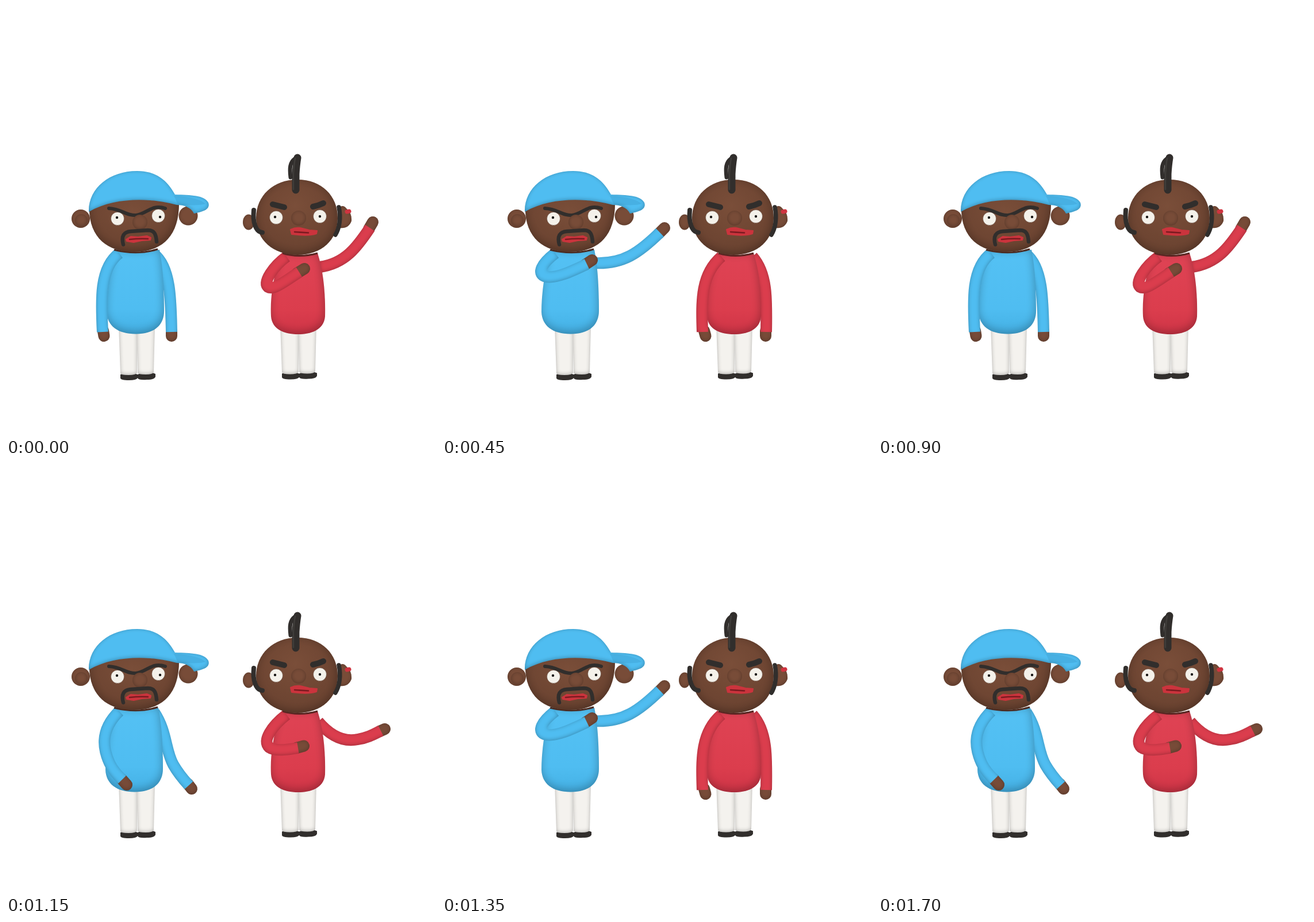
Animation, 748 px wide and 748 px high, one loop 1800 ms. Source, as an HTML page without scripts:

```html
<!DOCTYPE html>
<html lang="en">
<head>
<meta charset="utf-8">
<title>Two clay figures waving</title>
<style>
  html, body { margin: 0; width: 100%; height: 100%; overflow: hidden; background: #fff; }
  svg { display: block; width: 100vw; height: 100vh; }

  .blue { --cloth: #4fbdf1; --body: url(#blueCloth); }
  .red { --cloth: #db3d4d; --body: url(#redCloth); }
  .torso { fill: var(--body); filter: url(#soft); }
  .arm { fill: none; stroke: var(--cloth); stroke-width: 20; filter: url(#clay); }
  .hand { stroke: #774b38; stroke-linecap: round; }
  .head { fill: url(#skin); filter: url(#soft); }
  .bump { fill: #784c38; filter: url(#clay); }
  .hair { fill: none; stroke: #312e2c; stroke-linecap: round; stroke-linejoin: round; }
  .lip { fill: #cb343d; stroke: #cb343d; stroke-width: 2; stroke-linejoin: round; }
  .slit { fill: none; stroke: #7b1b20; stroke-width: 2.5; stroke-linecap: round; }
  .eye { fill: #f4f1ea; stroke: #4b2d20; stroke-opacity: .5; }
  .pupil { fill: #171514; }

  /* one swing there and back: rest 250, pass 100 + 100, rest 250, pass 100 + 100 */
  .pose { animation: 900ms step-end infinite; visibility: hidden; }
  .p1 { animation-name: p1; }
  .p2 { animation-name: p2; }
  .p3 { animation-name: p3; }
  .p4 { animation-name: p4; }
  @keyframes p1 { 0% { visibility: visible } 27.77%, 100% { visibility: hidden } }
  @keyframes p2 { 0%, 38.88% { visibility: hidden } 27.77%, 88.88%, 100% { visibility: visible } }
  @keyframes p3 { 0%, 49.99%, 88.88%, 100% { visibility: hidden } 38.88%, 77.77% { visibility: visible } }
  @keyframes p4 { 0%, 77.77%, 100% { visibility: hidden } 49.99% { visibility: visible } }
</style>
</head>
<body>
<svg viewBox="0 0 748 748" role="img" aria-label="Two clay figures taking turns to wave">
  <defs>
    <filter id="clay" x="-100%" y="-100%" width="300%" height="300%" color-interpolation-filters="sRGB">
      <feGaussianBlur in="SourceAlpha" stdDeviation="3.500"/>
      <feOffset dx="-.5" dy="-1.500" result="core"/>
      <feComposite in="SourceAlpha" in2="core" operator="out"/>
      <feComponentTransfer result="shade"><feFuncA type="linear" slope=".28"/></feComponentTransfer>
      <feMerge><feMergeNode in="SourceGraphic"/><feMergeNode in="shade"/></feMerge>
    </filter>
    <filter id="soft" x="-20%" y="-20%" width="140%" height="140%" color-interpolation-filters="sRGB">
      <feGaussianBlur in="SourceAlpha" stdDeviation="8"/>
      <feOffset dx="-1" dy="-3" result="core"/>
      <feComposite in="SourceAlpha" in2="core" operator="out"/>
      <feComponentTransfer result="shade"><feFuncA type="linear" slope=".28"/></feComponentTransfer>
      <feMerge><feMergeNode in="SourceGraphic"/><feMergeNode in="shade"/></feMerge>
    </filter>
    <linearGradient id="blueCloth" x2="0" y2="1">
      <stop stop-color="#54c1f4"/><stop offset=".7" stop-color="#4fbdf1"/><stop offset="1" stop-color="#44b0e4"/>
    </linearGradient>
    <linearGradient id="redCloth" x2="0" y2="1">
      <stop stop-color="#df4354"/><stop offset=".7" stop-color="#db3d4d"/><stop offset="1" stop-color="#ce3446"/>
    </linearGradient>
    <radialGradient id="skin" cx=".48" cy=".35" r=".7">
      <stop stop-color="#7a4e39"/><stop offset="1" stop-color="#68412f"/>
    </radialGradient>

    <path id="blueTorso" class="torso" d="M188 425Q226 433 265 424C272 458 273 500 273 530C273 556 255 570.500 224 570.500C192 570.500 174 556 173 532C173 500 179 458 188 425Z"/>
    <path id="redTorso" class="torso" d="M481 430Q511 438 542 430C552 460 556 500 555 540C553 564 530 571 508 571C483 571 463 562 461 540C459 500 467 460 481 430Z"/>

    <g id="legs">
      <g fill="#312e2c">
        <path d="M199 641Q214 634 229 641V647Q227 651 214 651Q199 651 199 647Z"/>
        <path d="M229 641Q245 633 260 640V645Q258 650 245 650Q230 651 229 647Z"/>
      </g>
      <g fill="#f4f2ee" filter="url(#clay)">
        <path d="M196 556H228V638Q226 642 213 642Q200 642 199 639Z"/>
      </g>
      <g fill="#f4f2ee" filter="url(#clay)">
        <path d="M227 556H259L257 637Q255 641 243 641Q230 641 229 638Z"/>
      </g>
    </g>
  </defs>

  <use href="#legs"/>
  <use href="#legs" x="281" y="-1.500"/>

  <g class="pose p1">
    <g class="blue">
      <g class="arm"><path class="hand" d="M288 565V574"/><path d="M258 432C286 454 287 510 288 567"/></g>
      <use href="#blueTorso" x="2"/>
      <g class="arm"><path class="hand" d="M169 565L170.500 574"/><path d="M197 430C163 455 165 510 168 567"/></g>
    </g>
    <g class="red">
      <g class="arm"><path class="hand" d="M631 388L638 376"/><path d="M546 454C590 448 611 419 633 386"/></g>
      <use href="#redTorso"/>
      <g class="arm"><path class="hand" d="M506 465L519 457"/><path d="M488 436C466 452 446 480 456 489C466 495 489 476 510 463"/></g>
    </g>
  </g>

  <g class="pose p2">
    <g class="blue">
      <g class="arm"><path class="hand" d="M316 556L323 565"/><path d="M258 432C280 465 277 498 291 523C299 537 308 548 318 559"/></g>
      <use href="#blueTorso"/>
      <g class="arm"><path class="hand" d="M201 548L210 558"/><path d="M197 430C160 466 171 500 180 520C186 533 194 541 202 549"/></g>
    </g>
    <g class="red">
      <g class="arm"><path class="hand" d="M650 465L659 461"/><path d="M543 448C565 474 588 484 612 479C630 476 640 470 652 464"/></g>
      <use href="#redTorso"/>
      <g class="arm"><path class="hand" d="M505 494L518 490.500"/><path d="M488 436C462 456 445 482 458 493C468 500 490 497 508 494"/></g>
    </g>
  </g>

  <g class="pose p3">
    <g class="blue">
      <g class="arm"><path class="hand" d="M366 500L377 499.500"/><path d="M260 436C276 470 285 482 302 490C325 501 348 501 368 500"/></g>
      <use href="#blueTorso" x="-1"/>
      <g class="arm"><path class="hand" d="M232 509L246 510"/><path d="M197 430C158 469 166 486 182 495C196 502 214 507 234 509"/></g>
    </g>
    <g class="red">
      <g class="arm"><path class="hand" d="M615 544L624.500 548.500"/><path d="M544 448C567 475 566 500 582 520C592 534 605 541 617 545"/></g>
      <use href="#redTorso"/>
      <g class="arm"><path class="hand" d="M499 517L512 519.500"/><path d="M488 436C455 468 448 490 462 502C472 510 488 515 501 518"/></g>
    </g>
  </g>

  <g class="pose p4">
    <g class="blue">
      <g class="arm"><path class="hand" d="M377 396L387 386"/><path d="M264 447C315 450 343 429 379 394"/></g>
      <use href="#blueTorso"/>
      <g class="arm"><path class="hand" d="M249 450L261 442"/><path d="M197 430C172 449 166 465 178 470C195 476 225 462 252 449"/></g>
    </g>
    <g class="red">
      <g class="arm"><path class="hand" d="M563 565V574"/><path d="M540 436C566 465 565 510 564 567"/></g>
      <use href="#redTorso"/>
      <g class="arm"><path class="hand" d="M456 565L458.500 574"/><path d="M486 436C451 466 451 510 453 567"/></g>
    </g>
  </g>

  <g id="capMan">
    <g class="bump"><circle cx="130" cy="370" r="16"/></g>
    <g class="bump"><circle cx="131" cy="373" r="11"/></g>
    <g class="bump"><circle cx="317" cy="365" r="16.500"/></g>
    <path d="M188 424Q228 434 264 423" fill="none" stroke="#4a2b22" stroke-width="3"/>
    <path class="head" d="M145 345C142 402 176 428 222 428C270 428 302 402 301 340C250 310 180 315 145 345Z"/>
    <g filter="url(#clay)">
      <path fill="#4fbdf1" d="M144 358C143 317 180 287 228 287C262 287 281 304 294 328C322 329 345 329 352 342C356 354 343 358 327 361C322 350 309 346 297 346C255 334 190 331 144 358Z"/>
    </g>
    <path d="M292 330C315 332 338 335 347 344C335 348 315 346 299 345Z" fill="#3593bf" opacity=".3"/>
    <circle class="eye" cx="194" cy="370" r="11.500"/><circle class="pupil" cx="193" cy="368" r="2.200"/>
    <circle class="eye" cx="265" cy="365" r="11.500"/><circle class="pupil" cx="268" cy="367" r="2.200"/>
    <path class="hair" stroke-width="6" d="M179 352C202 353 208 365 226 364C246 361 254 344 277 352"/>
    <g class="bump"><circle cx="233" cy="376" r="13"/></g>
    <path class="lip" d="M209 406L217 401L230 402L245 400L252 403L251 407L236 408L222 411L210 409Z"/>
    <path class="slit" d="M215 406Q232 404 247 405"/>
    <path class="hair" stroke-width="6.500" d="M204 415C200 400 205 393 217 392L247 390C258 390 261 397 262 410"/>
  </g>

  <g id="mohawkMan">
    <g class="bump"><ellipse cx="422" cy="376" rx="10" ry="13.500"/></g>
    <g class="bump"><path d="M578 352Q586 344 592 352Q602 360 601 374Q596 388 580 386Z"/></g>
    <path d="M593 358l4-1" stroke="#cf3440" stroke-width="7" stroke-linecap="round"/>
    <path class="hair" stroke-width="7" d="M495 298C493 282 494 272 502 266"/>
    <path d="M481 430Q510 439 542 430" fill="none" stroke="#5a2622" stroke-width="3"/>
    <path class="head" d="M507 302C549 302 577 330 577 369C577 407 549 433 507 433C465 433 435 407 435 369C435 330 465 302 507 302Z"/>
    <g class="hair">
      <path stroke-width="13" d="M504 320L504 292Q505 276 507 264"/>
      <path stroke-width="8" d="M431 355C429 376 434 393 446 394"/>
      <path stroke-width="7.500" d="M579 350C583 368 580 387 573 398"/>
      <path stroke-width="10" d="M464 345L484 350M534 349Q544 347 552 343"/>
    </g>
    <path d="M500 319V292Q501 276 503 265" fill="none" stroke="#4a4745" stroke-width="2.500" stroke-linecap="round" opacity=".6"/>
    <circle class="eye" cx="470" cy="368" r="11.500"/><circle class="pupil" cx="468" cy="367" r="2.200"/>
    <circle class="eye" cx="546" cy="366" r="11.500"/><circle class="pupil" cx="546" cy="366" r="2.200"/>
    <g class="bump"><circle cx="509" cy="369" r="13"/></g>
    <path class="lip" d="M495 389Q505 384 516 387L528 390L541 391L540 396Q528 400 508 398L497 397Z"/>
    <path class="slit" stroke-width="4" d="M502 393L526 394.500"/>
  </g>
</svg>
</body>
</html>
```
